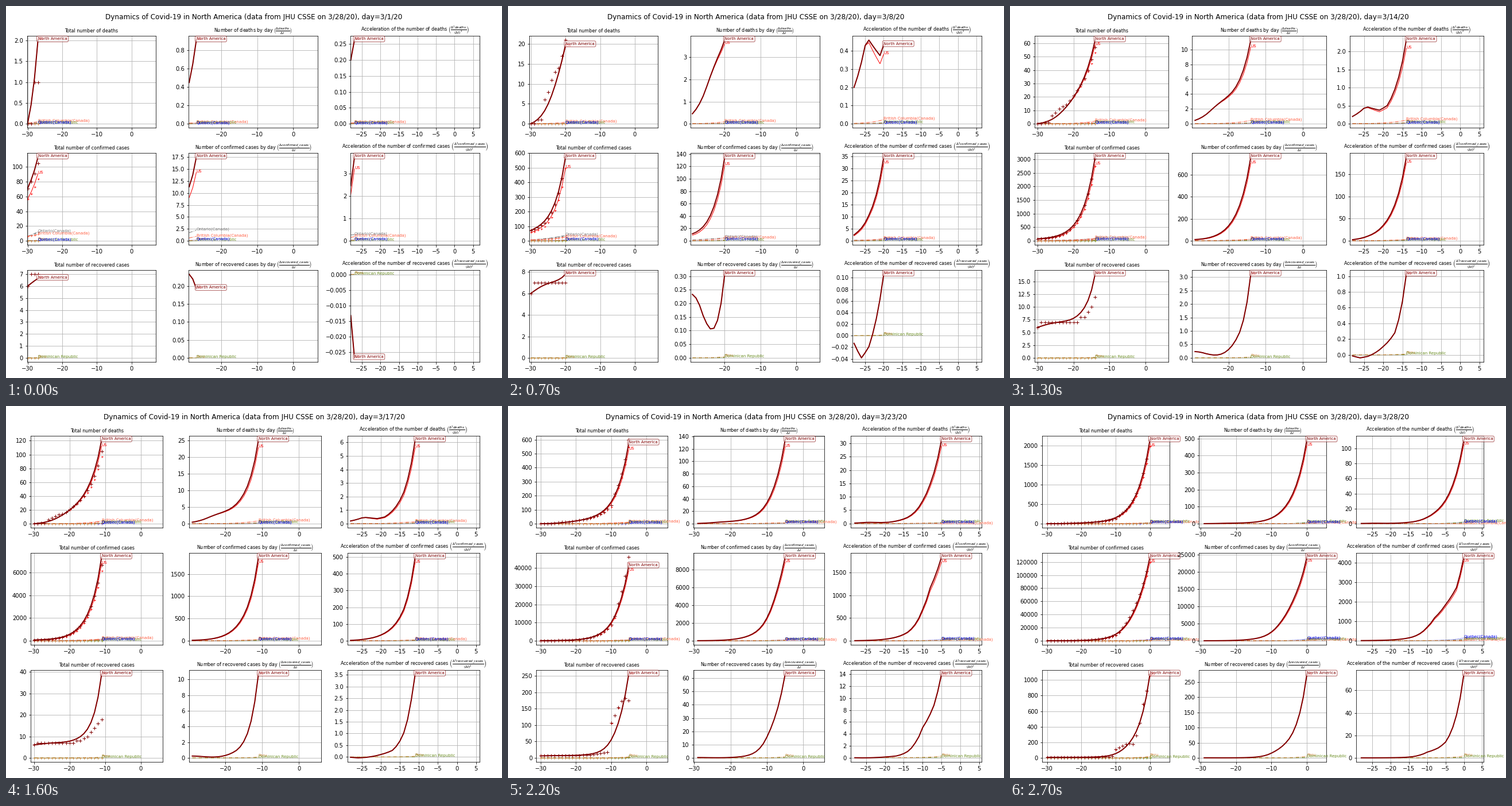
Animation of 864x648 px, one loop 5.7 s. Source, as a matplotlib script:

```python
import numpy as np
import matplotlib.pyplot as plt
from matplotlib.animation import FuncAnimation

W, H = 864, 648
DAYS = np.arange(-30, 1)
FIRST_DAY, LAST_STEP = -27, 27
PAD = 10.8                 # outer padding in pixels
TITLE_OVERHANG = 28.2      # how far the widest title sticks out
GAP_EXTRA = 2.3
LOG_SHIFT = 0.1            # keeps slightly negative values inside the logarithm

# name: colour, line style, line width; later labels cover earlier ones
STYLES = {
    "Peru": ("peru", "-.", 1),
    "British Columbia(Canada)": ("tomato", "-.", 1),
    "Ontario(Canada)": ("gray", "-.", 1),
    "Dominican Republic": ("olivedrab", "-.", 1),
    "Quebec(Canada)": ("blue", ":", 1),
    "US": ("red", "-", 1),
    "North America": ("maroon", "-", 2),
}


def through(points):
    """Daily values on straight lines between (day, value) points."""
    return np.interp(DAYS, *zip(*points))


def log_through(points):
    """Daily values that grow exponentially between the points."""
    logs = [(day, np.log(value + LOG_SHIFT)) for day, value in points]
    return np.exp(through(logs)) - LOG_SHIFT


def integrate(start, slope, accel):
    """Totals from a first value, a first daily change and its daily growth."""
    rate = slope + np.concatenate([[0], np.cumsum(accel)])
    return start + np.concatenate([[0], np.cumsum(rate)])


def growth(final, tau):
    return final * np.exp(DAYS / tau)


def logistic(ceiling, middle, tau):
    return ceiling / (1 + np.exp(-(DAYS - middle) / tau))


def build(start, slope, accel_points, us_points, count_points, others):
    """Smoothed totals and counted totals of every region."""
    accel = log_through(accel_points)[2:]
    share = through(us_points)
    whole = integrate(start, slope, accel)
    us = integrate(start * share[0], slope * share[0], accel * share[2:])
    smooth = {**others, "US": us, "North America": whole}
    # counted cases scatter around the smooth curve by a slowly varying ratio
    ratio = through(count_points)
    bumpy = {"US": us * ratio, "North America": whole * ratio}
    counted = {name: np.round(v) for name, v in {**others, **bumpy}.items()}
    return smooth, counted


deaths = build(
    0, 0.45,
    [(-28, .2), (-25, .43), (-24, .46), (-21, .375), (-19, .5), (-14, 2.32),
     (-10, 8.5), (-8, 14.8), (-5, 31.2), (0, 111.3)],
    [(-25, 1), (-21, .88), (0, .945)],
    [(-27, .5), (-26, 1.8), (-24, 1.52), (-22, 1.1), (-14, .91), (-10, .85),
     (-9, 1.07), (0, 1)],
    {
        "British Columbia(Canada)": logistic(17, -7, 3.4),
        "Ontario(Canada)": growth(18, 4),
        "Peru": logistic(20, -2, 3),
        "Dominican Republic": growth(28, 3),
        "Quebec(Canada)": growth(20, 2.7),
    })

confirmed = build(
    70.8, 11.3,
    [(-28, 2.45), (-27, 3.72), (-24, 10.6), (-20, 34.7), (-14, 188),
     (-10, 690), (-8, 1165), (-5, 1840), (-2, 2720), (0, 4274)],
    [(-30, .8), (-24, .92), (0, .95)],
    [(-30, 1), (-26, .9), (-20, 1), (-14, .98), (-10, .88), (-8, 1.13),
     (-5, 1.12), (0, 1)],
    {
        "British Columbia(Canada)": 4 + logistic(1100, -3, 4.4),
        "Ontario(Canada)": (6 + 1.5 * (DAYS + 30) + .12 * (DAYS + 30) ** 2
                            + growth(1000, 3.6)),
        "Peru": logistic(750, -5, 3),
        "Dominican Republic": growth(700, 3),
        "Quebec(Canada)": growth(2100, 3.35),
    })

recovered = build(
    6, 0.233,
    [(-28, -.0132), (-26, -.0383), (-24, -.019), (-20, .106), (-17, .28),
     (-14, 1.025), (-12, 2.45), (-10, 5.05), (-7, 8.8), (-5, 14), (0, 74.4)],
    [(-20, 1), (0, .985)],
    [(-30, 1), (-29, 1.12), (-20, .9), (-14, .74), (-11, .46), (-10, 1.95),
     (-7, 1.21), (-5, .69), (-2, 1.16), (0, 1)],
    {
        "Peru": growth(18, 2.8),
        "Dominican Republic": growth(3, 3),
    })

ROWS = [("deaths", deaths), ("confirmed cases", confirmed),
        ("recovered cases", recovered)]


def titles(topic):
    symbol = topic.replace(" ", r"\_")
    return [
        f"Total number of {topic}",
        rf"Number of {topic} by day "
        rf"$\left(\frac{{\Delta {symbol}}}{{\Delta t}}\right)$",
        rf"Acceleration of the number of {topic} "
        rf"$\left(\frac{{\Delta^2 {symbol}}}{{(\Delta t)^2}}\right)$",
    ]


class Panel:
    """One chart: the order-th daily difference of every region."""

    def __init__(self, ax, title, smooth, counted, order):
        self.ax, self.order = ax, order
        self.days = DAYS[order:]
        self.series = []
        ax.set_title(title, fontsize=8)
        ax.grid(True)
        for rank, (name, (color, dash, width)) in enumerate(STYLES.items()):
            if name not in smooth:
                continue
            z = 2 + width / 10 - rank / 100
            curve, = ax.plot([], [], dash, color=color, lw=width, zorder=z)
            self.series.append((curve, np.diff(smooth[name], order),
                                self.make_label(name, color, 3 + rank / 100)))
            if order == 0:
                marks, = ax.plot([], [], "+", color=color, ms=3 * width,
                                 zorder=z)
                self.series.append((marks, counted[name], None))

    def make_label(self, name, color, z):
        box = None
        if name == "North America":
            box = dict(boxstyle="round", fc="white", ec=color, alpha=.6)
        return self.ax.text(0, 0, name, color=color, fontsize=7, bbox=box,
                            zorder=z)

    def show(self, last_day):
        shown = self.days <= last_day
        days = self.days[shown]
        low, high = np.inf, -np.inf
        for line, values, label in self.series:
            visible = values[shown]
            line.set_data(days, visible)
            low, high = min(low, visible.min()), max(high, visible.max())
            if label:
                label.set_position((last_day, visible[-1]))
        left = days[0] - .05 * (last_day - days[0])
        margin = .05 * (high - low)
        self.ax.set_xlim(left, left + 1.2 * len(self.days))
        self.ax.set_ylim(low - margin, high + margin)

    def label_width(self):
        return self.ax.bbox.x0 - self.ax.yaxis.get_tightbbox(None).x0


fig, axes = plt.subplots(3, 3, figsize=(W / 72, H / 72), dpi=72)
heading = fig.suptitle("", fontsize=12)
panels = [
    [Panel(axes[r, c], title, *data, order=c)
     for c, title in enumerate(titles(topic))]
    for r, (topic, data) in enumerate(ROWS)
]


def arrange():
    """Fit the columns to tick labels measured in the default layout."""
    fig.subplots_adjust(left=.125, right=.9, bottom=.11, top=.88,
                        wspace=.2, hspace=.2)
    widths = np.max([[p.label_width() for p in row] for row in panels], axis=0)
    left = PAD + widths[0]
    right = W - PAD - TITLE_OVERHANG
    gap = max(widths[1:].max(), TITLE_OVERHANG) + PAD + GAP_EXTRA
    cell = (right - left - 2 * gap) / 3
    fig.subplots_adjust(left=left / W, right=right / W, wspace=gap / cell,
                        top=1 - 52.1 / H, bottom=1 - 620.2 / H, hspace=.273)


def update(frame):
    step = min(frame, LAST_STEP)
    heading.set_text("Dynamics of Covid-19 in North America (data from JHU "
                     f"CSSE on 3/28/20), day=3/{step + 1}/20")
    for row in panels:
        for panel in row:
            panel.show(FIRST_DAY + step)
    arrange()
    return []


animation = FuncAnimation(fig, update, frames=57, interval=100,
                          init_func=lambda: [], repeat=True, repeat_delay=0)
plt.show()
```
